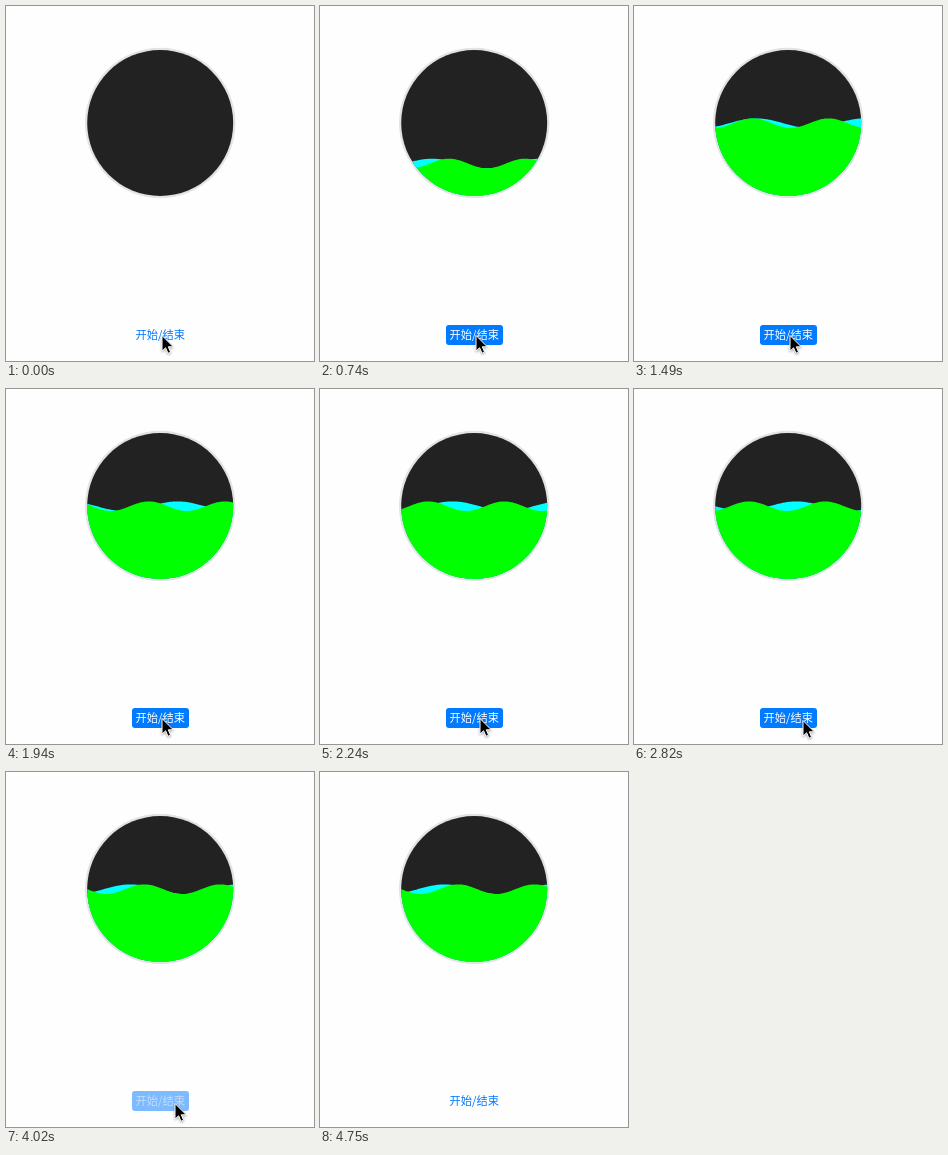
An HTML page for the animation above (6.09 s loop, 308 by 355 pixels).

```html
<!DOCTYPE html>
<html lang="zh-CN">
<head>
<meta charset="utf-8">
<title>Wave</title>
<style>
  html, body { margin: 0; width: 100%; height: 100%; overflow: hidden; background: #fefefe; }
  svg { display: block; width: 100%; height: 100%; }
  text { font: 11.25px "Noto Sans CJK SC", "Noto Sans CJK", sans-serif; text-anchor: middle; }
  #cursor { filter: drop-shadow(0 1px 1px rgba(0, 0, 0, .35)); }
</style>
</head>
<body>
<svg viewBox="0 0 308 355">
  <clipPath id="disc"><circle cx="154.2" cy="117" r="73"/></clipPath>
  <circle cx="154.2" cy="117" r="75.2" fill="#e2e4e3"/>
  <circle cx="154.2" cy="117" r="73" fill="#222"/>
  <g clip-path="url(#disc)">
    <path id="back" fill="#0ff"/>
    <path id="front" fill="#0f0"/>
  </g>
  <text id="plain" x="154.2" y="332.6" fill="#007aff">开始/结束</text>
  <g id="selected">
    <rect x="126" y="319" width="57" height="20" rx="3" fill="#007aff"/>
    <text x="154.2" y="332.6" fill="#fff">开始/结束</text>
  </g>
  <path id="cursor" d="M0 0V15.6L3.6 12.3 6 17.8 8.6 16.7 6.3 11.3H11.3Z" fill="#000" stroke="#fff" stroke-width="1"/>
</svg>
<script>
const LOOP = 6090;
const TICKS = [0, 450, 600, 740, 890, 1040, 1190, 1340, 1490, 1640, 1790, 1940, 2090, 2240, 2380,
  2530, 2680, 2820, 2970, 3120, 3270, 3420, 3570, 3720, 3870, 4020, 4170, 4460, 4610, 4750];
const STOP = 24.45; // tick at which the waves freeze
const AMPLITUDE = 4.8;
const WAVES = {
  front: { period: 76, crest: 129, speed: 17.28 },
  back: { period: 108, crest: 112, speed: 19.55 }
};
// [first tick, x, y]
const CURSOR = [[0, 156, 329.5], [13, 160, 329.5], [14, 163, 330], [15, 166, 330.5], [16, 168, 331],
  [17, 169, 331.5], [27, 183, 338], [28, 205, 349], [29, 320, 370]];

const $ = id => document.getElementById(id);
const lastUpTo = (list, value, key = v => v) => list.findLastIndex(v => key(v) <= value);

function wavePath({ period, crest, speed }, tick) {
  const level = Math.max(117.2, 157.5 - 14.9 * (tick - 3));
  const top = crest - speed * (Math.min(tick, STOP) - 3);
  let d = 'M79 195';
  for (let x = 79; x <= 230; x++) {
    const y = level - AMPLITUDE * Math.cos(2 * Math.PI * (x - top) / period);
    d += `L${x} ${y.toFixed(2)}`;
  }
  return d + 'L230 195Z';
}

function buttonFill(tick) {
  if (tick === 0 || tick > 25) return 0;
  return tick === 1 || tick === 25 ? 0.5 : 1;
}

let shown = -1;
function draw(tick) {
  for (const id in WAVES) $(id).setAttribute('d', tick ? wavePath(WAVES[id], tick) : '');
  const fill = buttonFill(tick);
  $('selected').setAttribute('opacity', fill);
  $('plain').setAttribute('opacity', 1 - fill);
  const [, x, y] = CURSOR[lastUpTo(CURSOR, tick, v => v[0])];
  $('cursor').setAttribute('transform', `translate(${x} ${y})`);
}

const start = performance.now();
function frame() {
  const tick = lastUpTo(TICKS, (performance.now() - start) % LOOP);
  if (tick !== shown) draw(shown = tick);
  requestAnimationFrame(frame);
}
frame();
</script>
</body>
</html>
```
